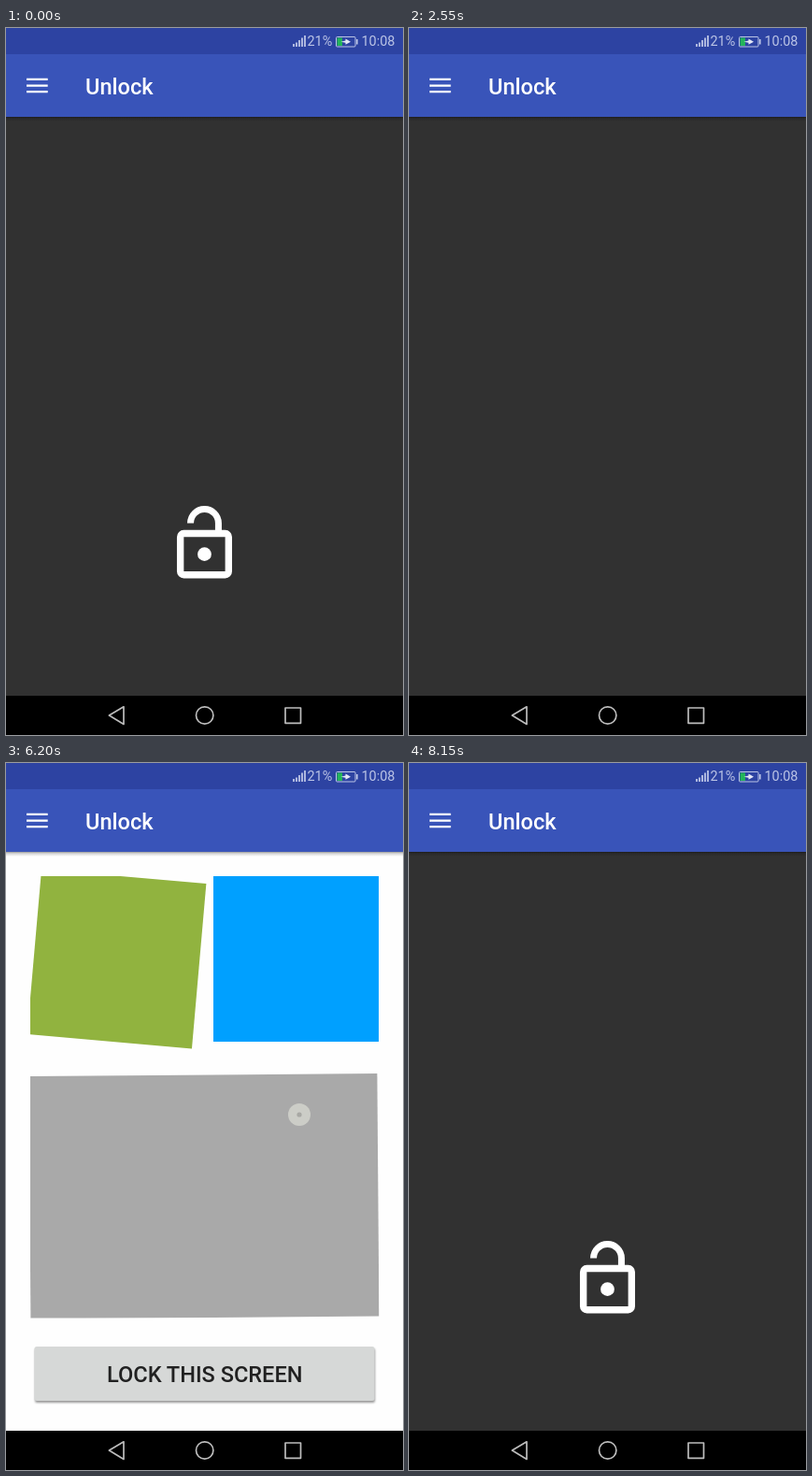
An HTML page that plays this animation: 425 px wide and 756 px high, repeating every 8200 ms.

```html
<!DOCTYPE html>
<html lang="en">
<head>
<meta charset="utf-8">
<title>Unlock</title>
<style>
  html, body { margin: 0; width: 100%; height: 100%; overflow: hidden; background: #000; }
  svg { display: block; width: 100vw; height: 100vh; }
  text { font-family: Roboto, "Noto Sans", sans-serif; }
  .label { font-size: 23.6px; font-weight: 500; }
  .status { font-size: 14.4px; fill: #bcc5e6; }
</style>
</head>
<body>
<svg viewBox="0 0 425 756">
  <defs>
    <linearGradient id="shade" x2="0" y2="1">
      <stop offset="0" stop-color="#000" stop-opacity=".4"/>
      <stop offset=".35" stop-color="#000" stop-opacity=".16"/>
      <stop offset="1" stop-color="#000" stop-opacity="0"/>
    </linearGradient>
    <filter id="soft" x="-5%" y="-20%" width="110%" height="150%">
      <feGaussianBlur stdDeviation="1.3"/>
    </filter>
    <clipPath id="reveal"><circle id="hole" cx="212.5" cy="714" r="0"/></clipPath>
    <clipPath id="panel"><rect x="26" y="121" width="373.5" height="472.5"/></clipPath>
  </defs>

  <rect y="90" width="425" height="630" fill="#313131"/>
  <g id="lock" fill="none" stroke="#fff">
    <g transform="translate(168.2 507.3) scale(3.69)">
      <rect x="5" y="9" width="14" height="12" rx="1" stroke-width="2"/>
      <path d="M7.95 6a4.05 4.05 0 0 1 8.1 0v3" stroke-width="1.9"/>
      <circle cx="12" cy="15" r="2" fill="#fff" stroke="none"/>
    </g>
  </g>

  <g clip-path="url(#reveal)">
    <rect y="90" width="425" height="630" fill="#fefefe"/>
    <g clip-path="url(#panel)">
      <rect id="green" x="26" y="121" width="177" height="177" fill="#91b33f"/>
      <rect id="blue" x="222" y="121" width="177" height="177" fill="#00a0ff"/>
      <rect id="gray" x="26" y="333.5" width="373" height="259.5" fill="#a9a9a9"/>
    </g>
    <rect x="31" y="626" width="364" height="58" rx="2" fill="#000" opacity=".4" filter="url(#soft)"/>
    <rect x="30.5" y="624" width="364" height="58" rx="2.5" fill="#d6d8d7"/>
    <text class="label" x="212.8" y="661.5" text-anchor="middle" fill="#212121">LOCK THIS SCREEN</text>
  </g>

  <rect y="95" width="425" height="5" fill="url(#shade)"/>
  <rect y="28" width="425" height="67" fill="#3954b9"/>
  <rect width="425" height="28" fill="#2d43a2"/>
  <path d="M22 54.8h22.7M22 61.6h22.7M22 68.2h22.7" stroke="#fff" stroke-width="2.3"/>
  <text class="label" x="85" y="70.8" fill="#fff">Unlock</text>

  <path d="M308 20v-3M311 20v-4.5M314 20v-7M317 20v-9.5M320 20v-12" stroke="#bcc5e6" stroke-width="1.8"/>
  <text class="status" x="322.5" y="19.4">21%</text>
  <rect x="353.5" y="9.5" width="20.5" height="10.5" rx="1" fill="none" stroke="#bcc5e6"/>
  <rect x="354.5" y="10.5" width="5.5" height="8.5" fill="#23b45a"/>
  <path d="M375.8 12v5.5" stroke="#bcc5e6" stroke-width="1.6"/>
  <path d="M358.5 14.8l5-1.2v-2l5.5 3.2-5.5 3v-2z" fill="#e3e7f5"/>
  <text class="status" x="380.5" y="19.4">10:08</text>

  <rect y="714" width="425" height="42" fill="#000"/>
  <g fill="none" stroke="#bdbdbd" stroke-width="1.7" stroke-linejoin="round">
    <path d="M126 725.8v18.6l-15.6-9.3z"/>
    <circle cx="212.7" cy="735" r="9.2"/>
    <rect x="299" y="727" width="16.5" height="16.3"/>
  </g>

  <g id="dot" opacity="0">
    <circle r="12" fill="#d8d9d2" opacity=".75"/>
    <circle r="2.6" fill="#8f908c" opacity=".6"/>
  </g>
</svg>
<script>
const LOOP = 8200, STEP = 50, FULL = 660, DROP = 205;
const $ = id => document.getElementById(id);
const clamp = v => Math.max(0, Math.min(1, v));
const span = (t, from, to) => clamp((t - from) / (to - from));
const smooth = k => (1 - Math.cos(Math.PI * k)) / 2;

// time of release, x, y, target
const taps = [
  [1900, 212, 650, 'button'],
  [4853, 250, 498, 'gray'],
  [5150, 262, 470, 'gray'],
  [5450, 120, 225, 'green'],
  [5800, 285, 420, 'gray'],
  [6200, 314, 376, 'gray'],
  [6450, 312, 240, 'blue'],
  [6920, 119, 278, 'green'],
  [7250, 212, 650, 'button']
];

// id, centre x, centre y, tilt in degrees, sideways shift
const tiles = [
  ['green', 114.5, 209.5, 5, 4],
  ['blue', 310.5, 209.5, 5, 4],
  ['gray', 212.5, 463.25, 0.45, 0.6]
];

// Each tap swings the tile back and forth, then leaves it tilted.
function swing(t, id) {
  const tap = taps.filter(p => p[3] === id && p[0] <= t).pop();
  return tap ? -Math.cos(Math.PI * Math.min(t - tap[0], 350) / 70) : 0;
}

function lockDrop(t) {
  if (t < 1500) return smooth(span(t, 150, 850));
  const [rise, fall] = t < 5000 ? [2650, 3000] : [8000, 9000];
  const left = 1 - span(t, rise, rise + 150);
  return left * left + smooth(span(t, fall, fall + 800));
}

function radius(t) {
  const [open, close] = t < 2700 ? [1035, 2050] : [3835, 7400];
  if (t >= close) return FULL * (1 - smooth(span(t, close, close + 500)));
  return FULL * Math.sin(span(t, open, open + 430) * Math.PI / 2);
}

function draw(t) {
  $('lock').setAttribute('transform', `translate(0 ${DROP * lockDrop(t)})`);
  $('hole').setAttribute('r', radius(t));
  for (const [id, cx, cy, tilt, shift] of tiles) {
    const s = swing(t, id);
    $(id).setAttribute('transform', `translate(${s * shift} 0) rotate(${s * tilt} ${cx} ${cy})`);
  }
  const tap = taps.find(([at]) => t > at - 150 && t < at + 100);
  const dot = $('dot');
  dot.setAttribute('opacity', tap ? Math.min(span(t, tap[0] - 150, tap[0]), 1 - span(t, tap[0], tap[0] + 100)) : 0);
  if (tap) dot.setAttribute('transform', `translate(${tap[1]} ${tap[2]})`);
}

function tick() {
  const t = performance.now() % LOOP;
  draw(Math.floor(t / STEP) * STEP);
  requestAnimationFrame(tick);
}
tick();
</script>
</body>
</html>
```
